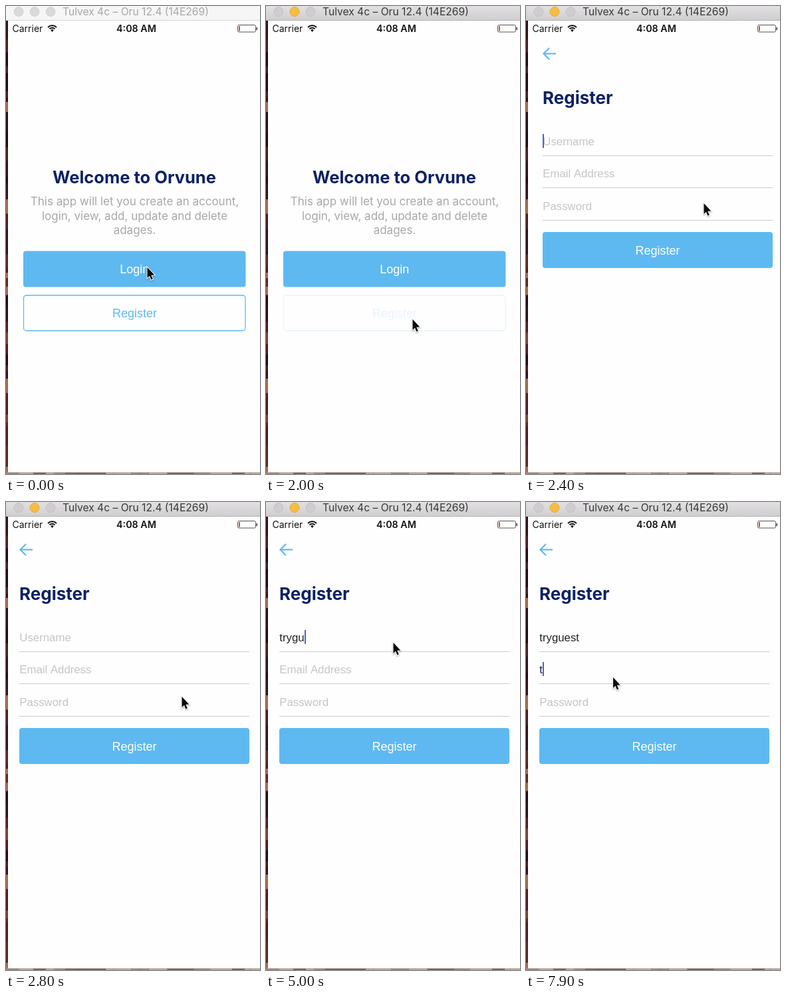
Animation of 382x702 px, one loop 8 s. Source, as an HTML page with a canvas:

```html
<!DOCTYPE html>
<html lang="en">
<head>
<meta charset="utf-8">
<title>Register flow</title>
<style>
html, body { margin: 0; width: 100%; height: 100%; overflow: hidden; background: #fff; }
canvas { display: block; width: 382px; height: 702px; }
</style>
</head>
<body>
<canvas id="stage" width="382" height="702"></canvas>
<script>
const W = 382, H = 702, LOOP = 8000;
const ctx = document.getElementById('stage').getContext('2d');
const SF = 'Inter, Roboto, sans-serif';
const HELV = '"Liberation Sans", Arial, sans-serif';
const BLUE = '#5eb9f0', NAVY = '#0c2163', HINT = '#c5c5ca';

const clamp = v => Math.max(0, Math.min(1, v));
const ramp = (t, a, b) => clamp((t - a) / (b - a));

function text(str, x, y, font, color, align = 'left') {
  ctx.font = font;
  ctx.fillStyle = color;
  ctx.textAlign = align;
  ctx.fillText(str, x, y);
}

function box(x, y, w, h, r) {
  ctx.beginPath();
  ctx.roundRect(x, y, w, h, r);
}

function rect(x, y, w, h, color) {
  ctx.fillStyle = color;
  ctx.fillRect(x, y, w, h);
}

function line(points, color, width) {
  ctx.beginPath();
  points.forEach(([x, y]) => ctx.lineTo(x, y));
  ctx.strokeStyle = color;
  ctx.lineWidth = width;
  ctx.stroke();
}

// Sliver of desktop wallpaper along the left and bottom edges
function wallpaper() {
  const dark = ['#1f0912', '#32121a', '#4a1d1c', '#28101a'];
  const warm = ['#5a2820', '#7d4030', '#a06a4e', '#4a1d1c'];
  let seed = 11;
  const rnd = () => (seed = (seed * 16807) % 2147483647) / 2147483647;
  const pick = list => list[Math.floor(rnd() * list.length)];
  rect(0, 0, W, H, '#3a171c');
  for (let y = 22; y < H;) {
    const h = 6 + rnd() * 18;
    rect(0, y, 3, h, pick(rnd() < y / H ? warm : dark));
    y += h;
  }
  for (let x = 0; x < W;) {
    const w = 8 + rnd() * 22;
    rect(x, 699, w, 3, pick(['#a9826f', '#8d5a4a', '#c4a692']));
    x += w;
  }
}

function titleBar(active) {
  const fill = ctx.createLinearGradient(0, 0, 0, 21);
  fill.addColorStop(0, active ? '#e2e0e2' : '#f6f6f6');
  fill.addColorStop(1, active ? '#d0ced0' : '#f6f6f6');
  rect(0, 0, W, 21, fill);
  rect(0, 21, W, 1, active ? '#b4b2b4' : '#d6d6d6');
  [19, 43, 67].forEach((x, i) => {
    const yellow = active && i === 1;
    ctx.beginPath();
    ctx.arc(x, 8.5, 7, 0, 7);
    ctx.fillStyle = yellow ? '#f7bd3c' : active ? '#cfcdcf' : '#dadada';
    ctx.fill();
    ctx.strokeStyle = yellow ? '#dfa633' : active ? '#bfbdbf' : '#cfcfcf';
    ctx.lineWidth = 0.8;
    ctx.stroke();
  });
  text('Tulvex 4c – Oru 12.4 (14E269)', 85, 14, '15.6px ' + SF, active ? '#383838' : '#a6a6a6');
}

function statusBar() {
  text('Carrier', 9.5, 39, '14px ' + SF, '#111');
  text('4:08 AM', 196, 39, '600 14.3px ' + SF, '#111', 'center');
  ctx.strokeStyle = '#111';
  ctx.lineWidth = 2;
  for (const r of [9.2, 5.8]) {
    ctx.beginPath();
    ctx.arc(69.5, 38.5, r, -Math.PI * 0.75, -Math.PI * 0.25);
    ctx.stroke();
  }
  ctx.beginPath();
  ctx.moveTo(69.5, 39);
  ctx.arc(69.5, 38.5, 3.3, -Math.PI * 0.75, -Math.PI * 0.25);
  ctx.fillStyle = '#111';
  ctx.fill();
  box(348.5, 28.5, 27, 10.5, 2);
  ctx.strokeStyle = '#555';
  ctx.lineWidth = 1;
  ctx.stroke();
  rect(350, 30, 2, 7.5, '#f0433a');
  rect(376.5, 32, 1.5, 4, '#444');
}

function solidButton(label, x, y, w) {
  box(x, y, w, 54, 4);
  ctx.fillStyle = BLUE;
  ctx.fill();
  text(label, x + w / 2, y + 33.5, '18px ' + HELV, '#fff', 'center');
}

function welcome(alpha, press) {
  ctx.globalAlpha = alpha;
  text('Welcome to Orvune', 193, 266, 'bold 25.5px ' + SF, NAVY, 'center');
  ['This app will let you create an account,',
   'login, view, add, update and delete',
   'adages.'].forEach((s, i) =>
    text(s, 193.5, 299 + i * 21.5, '17px ' + SF, '#a8a8a8', 'center'));
  solidButton('Login', 26, 367.5, 334.5);
  ctx.globalAlpha = alpha * press;
  box(26.5, 434, 333.5, 53, 4);
  ctx.strokeStyle = BLUE;
  ctx.lineWidth = 1.3;
  ctx.stroke();
  text('Register', 193.5, 467, '18px ' + HELV, BLUE, 'center');
  ctx.globalAlpha = 1;
}

const KEYS = [4200, 4400, 4600, 4700, 4900, 5200, 5400, 5600];
const FIELDS = [
  { hint: 'Username', value: 'tryguest', keys: KEYS, from: 2050, to: 6700 },
  { hint: 'Email Address', value: 't', keys: [7700], from: 6900, to: LOOP },
  { hint: 'Password', value: '', keys: [], from: LOOP, to: LOOP }
];

// Caret stays on 600 ms, fades out, then fades back in within one second
function caretAlpha(since) {
  const p = since % 1000;
  return p < 800 ? 1 - ramp(p, 600, 700) : ramp(p, 900, 1000);
}

function field(f, i, t) {
  const y = 209 + i * 48.4;
  const typed = f.keys.filter(k => k <= t);
  const value = f.value.slice(0, typed.length);
  text(value || f.hint, 20.3, y, '16.8px ' + HELV, value ? '#222' : HINT);
  rect(20, Math.round(y + 14.7), 346, 1, '#cbcbcb');
  if (t < f.from || t >= f.to) return;
  const x = Math.round(20.3 + (value ? ctx.measureText(value).width : 0));
  ctx.globalAlpha = caretAlpha(t - (typed.length ? typed[typed.length - 1] : f.from));
  rect(x, Math.round(y - 17), 2, 21, '#4666d8');
  ctx.globalAlpha = 1;
}

function register(t) {
  line([[40, 71.5], [21.5, 71.5]], BLUE, 2.2);
  line([[30, 63], [21.5, 71.5], [30, 80]], BLUE, 2.2);
  text('Register', 20, 147, 'bold 26px ' + SF, NAVY);
  FIELDS.forEach((f, i) => field(f, i, t));
  solidButton('Register', 20, 339, 346);
}

const PATH = [
  [0, 212, 392], [900, 222, 440], [1600, 220, 470], [2100, 220, 470],
  [2400, 267, 296], [2800, 264, 292], [3500, 202, 218], [3700, 191, 211],
  [6000, 191, 211], [6400, 134, 233], [6500, 134, 233], [6700, 130.5, 263], [LOOP, 130.5, 263]
];

function pointerAt(t) {
  const i = Math.max(1, PATH.findIndex(p => p[0] > t));
  const [a, b] = [PATH[i - 1], PATH[i]];
  const p = ramp(t, a[0], b[0]), e = p * p * (3 - 2 * p);
  return [a[1] + (b[1] - a[1]) * e, a[2] + (b[2] - a[2]) * e];
}

function pointer(x, y) {
  ctx.save();
  ctx.translate(x, y);
  ctx.beginPath();
  [[0.5, 0], [0.5, 16], [4, 12.7], [6.3, 18.6], [8.8, 17.6], [6.4, 11.8], [11.3, 11.4]]
    .forEach(([px, py]) => ctx.lineTo(px, py));
  ctx.closePath();
  ctx.shadowColor = 'rgba(0,0,0,.35)';
  ctx.shadowBlur = 2;
  ctx.shadowOffsetY = 1;
  ctx.strokeStyle = '#fff';
  ctx.lineWidth = 2;
  ctx.stroke();
  ctx.shadowColor = 'transparent';
  ctx.fillStyle = '#0a0a0a';
  ctx.fill();
  ctx.restore();
}

// The new card slides in from the right while the old one drifts and dims
function cards(t) {
  const rest = Math.pow(1 - ramp(t, 2070, 2570), 4);
  ctx.save();
  ctx.beginPath();
  ctx.rect(3, 22, W - 3, 677);
  ctx.clip();
  if (rest > 0) {
    ctx.save();
    ctx.translate(-10 * (1 - rest), 0);
    welcome(0.3 + 0.7 * rest, 1 - 0.86 * ramp(t, 1750, 1950) * (1 - ramp(t, 2050, 2300)));
    ctx.restore();
  }
  if (rest < 1) {
    ctx.translate(Math.round(W * rest), 0);
    rect(3, 22, W, 677, '#fefefe');
    register(t);
  }
  ctx.restore();
}

function draw(t) {
  wallpaper();
  rect(3, 22, W - 3, 677, '#fefefe');
  cards(t);
  rect(3, 699, W - 3, 1, '#c9c4c2');
  titleBar(t >= 1800);
  statusBar();
  pointer(...pointerAt(t));
}

const start = performance.now();
function tick() {
  const t = (performance.now() - start) % LOOP;
  draw(Math.floor(t / 100) * 100);
  requestAnimationFrame(tick);
}
tick();
</script>
</body>
</html>
```
